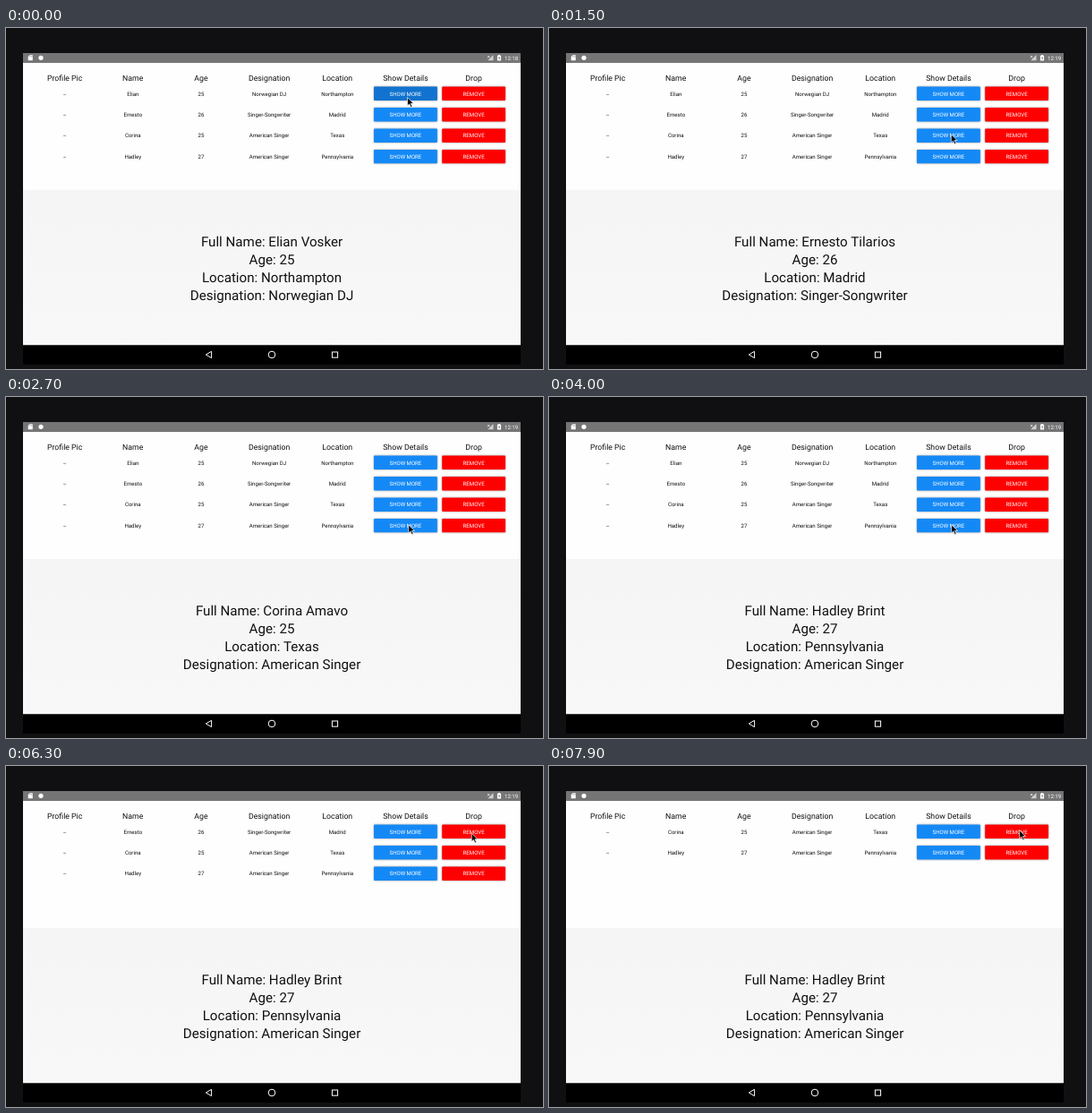
Recreate the animation shown at these times as an HTML page. Size 600 by 381 pixels, loop 8000 ms.

```html
<!DOCTYPE html>
<html lang="en">
<head>
<meta charset="utf-8">
<title>Profile list</title>
<style>
  html, body { margin: 0; width: 100%; height: 100%; overflow: hidden; background: #100f11; }
  svg { display: block; width: 600px; height: 381px; font-family: Roboto, sans-serif; }
  text { text-anchor: middle; text-rendering: geometricPrecision; }
  .button { filter: drop-shadow(0 .8px .8px rgba(0, 0, 0, .42)); }
</style>
</head>
<body>
<svg id="stage" viewBox="0 0 600 381" xmlns="http://www.w3.org/2000/svg">
  <defs>
    <linearGradient id="panel" x1="0" y1="0" x2="0" y2="1">
      <stop offset="0" stop-color="#f5f5f5"/>
      <stop offset="1" stop-color="#f8f8f8"/>
    </linearGradient>
  </defs>
  <rect width="600" height="381" fill="#100f11"/>
  <rect x="19" y="28" width="556" height="11" fill="#757575"/>
  <rect x="19" y="39" width="556" height="142" fill="#fefefe"/>
  <rect x="19" y="181" width="556" height="173.5" fill="url(#panel)"/>
  <rect x="19" y="354.5" width="556" height="21.5" fill="#000"/>

  <g fill="#fff">
    <path d="M26.5 30.3h3.3v6H24.7v-4.2z"/>
    <path d="M26.7 31.2v1.3M28 31.2v1.3M29.1 31.2v1.3" stroke="#757575" stroke-width=".5"/>
    <circle cx="39" cy="33.3" r="2.6"/>
    <path d="M544.5 30v6.2h-6.2z" opacity=".65"/>
    <path d="M538 31l2.4 2.4m0-2.4l-2.4 2.4" stroke="#fff" stroke-width=".7"/>
    <path d="M550 30h2v.7h1.1v5.8h-4.2v-5.8h1.1z"/>
    <path d="M551.3 31.6l-1.3 2.2h.9v1.9l1.3-2.4h-.9z" fill="#757575"/>
  </g>

  <g fill="none" stroke="#fff" stroke-width="1">
    <path d="M223.3 365l6.3-3.7v7.4z" stroke-linejoin="round"/>
    <circle cx="297" cy="365" r="3.8"/>
    <rect x="364.4" y="362" width="6.2" height="6.2"/>
  </g>

  <g id="table"></g>
  <g id="details"></g>
  <path id="cursor" d="M0 0V9.4L2.2 7.4L3.8 11L5.4 10.3L3.8 6.8H6.8Z"
    fill="#000" stroke="#fff" stroke-width=".7" stroke-linejoin="round"/>
</svg>
<script>
const LOOP = 8000, STEP = 100;
const COLUMNS = ["Profile Pic", "Name", "Age", "Designation", "Location", "Show Details", "Drop"];
const PEOPLE = [
  { first: "Elian", last: "Vosker", age: 25, job: "Norwegian DJ", place: "Northampton", gone: 6000 },
  { first: "Ernesto", last: "Tilarios", age: 26, job: "Singer-Songwriter", place: "Madrid", gone: 7300 },
  { first: "Corina", last: "Amavo", age: 25, job: "American Singer", place: "Texas", gone: LOOP },
  { first: "Hadley", last: "Brint", age: 27, job: "American Singer", place: "Pennsylvania", gone: LOOP }
];
const SHOWN = [0, 700, 1700, 3300];
// person, button (0 show, 1 remove), start, end
const PRESSES = [
  [0, 0, -200, 300], [1, 0, 500, 900], [2, 0, 1600, 1900],
  [3, 0, 3100, 3500], [0, 1, 5800, 6100], [1, 1, 7100, 7400]
];
// time, x, y of the pointer tip
const PATH = [
  [0, 448.5, 77.5], [100, 448.5, 77.5], [500, 449, 96], [900, 449, 96],
  [1300, 449.3, 118.8], [1900, 449.3, 118.8], [2300, 449.7, 142.7], [4700, 449.7, 142.7],
  [5200, 519.6, 78.2], [5500, 520.2, 75.3], [6400, 520.2, 75], [6700, 521.5, 75],
  [7000, 522, 75], [7700, 524, 73], [7800, 525.7, 71.7], [8000, 525.7, 71.7]
];

const $ = id => document.getElementById(id);
const columnX = i => 65.6 + i * 76.17;

function add(parent, tag, attrs) {
  const el = document.createElementNS("http://www.w3.org/2000/svg", tag);
  for (const key in attrs) el.setAttribute(key, attrs[key]);
  return parent.appendChild(el);
}

function label(parent, string, x, middle, size, fill = "#111") {
  const el = add(parent, "text", { x, y: middle + size * 0.355, "font-size": size, fill });
  el.textContent = string;
  return el;
}

function button(parent, x, string, color) {
  const box = { x: x - 35.4, y: -7.8, width: 70.8, height: 15.4, rx: 0.9 };
  add(parent, "rect", { ...box, fill: color, class: "button" });
  const shade = add(parent, "rect", { ...box, fill: "#000", opacity: 0 });
  label(parent, string, x, 0, 6.1, "#fff");
  return shade;
}

const clock = label($("stage"), "12:18", 564.6, 33.5, 6.1, "#fff");
COLUMNS.forEach((name, i) => label($("table"), name, columnX(i), 56, 8.75));

const rows = PEOPLE.map(p => {
  const group = add($("table"), "g", {});
  ["--", p.first, p.age, p.job, p.place].forEach((s, i) => label(group, s, columnX(i), 0, 6.1));
  const shades = [
    button(group, columnX(5), "SHOW MORE", "#1489f6"),
    button(group, columnX(6), "REMOVE", "#ff0000")
  ];
  return { group, shades };
});

const panels = PEOPLE.map(p => {
  const group = add($("details"), "g", {});
  [`Full Name: ${p.first} ${p.last}`, `Age: ${p.age}`, `Location: ${p.place}`, `Designation: ${p.job}`]
    .forEach((s, i) => label(group, s, 297, 238.3 + i * 20.2, 15.15));
  return group;
});

function pointerAt(t) {
  const i = PATH.findIndex(p => p[0] > t);
  const [t0, x0, y0] = PATH[i - 1], [t1, x1, y1] = PATH[i];
  const u = (t - t0) / (t1 - t0), k = u * u * (3 - 2 * u);
  return [x0 + (x1 - x0) * k, y0 + (y1 - y0) * k];
}

function draw(now) {
  const t = Math.floor(now % LOOP / STEP) * STEP;
  let slot = 0;
  PEOPLE.forEach((p, i) => {
    const visible = t < p.gone;
    rows[i].group.setAttribute("display", visible ? "inline" : "none");
    if (visible) rows[i].group.setAttribute("transform", `translate(0 ${73.4 + 23.45 * slot++})`);
    const current = t >= SHOWN[i] && !(t >= SHOWN[i + 1]);
    panels[i].setAttribute("display", current ? "inline" : "none");
  });
  for (const [person, kind, from, to] of PRESSES) {
    const u = (t - from) / (to - from);
    const shade = u >= 0 && u < 1 ? 0.17 * Math.sin(Math.PI * u) : 0;
    rows[person].shades[kind].setAttribute("opacity", shade);
  }
  clock.textContent = t < 1200 ? "12:18" : "12:19";
  $("cursor").setAttribute("transform", `translate(${pointerAt(t)})`);
}

const start = performance.now();
function frame() {
  draw(performance.now() - start);
  requestAnimationFrame(frame);
}
frame();
</script>
</body>
</html>
```
